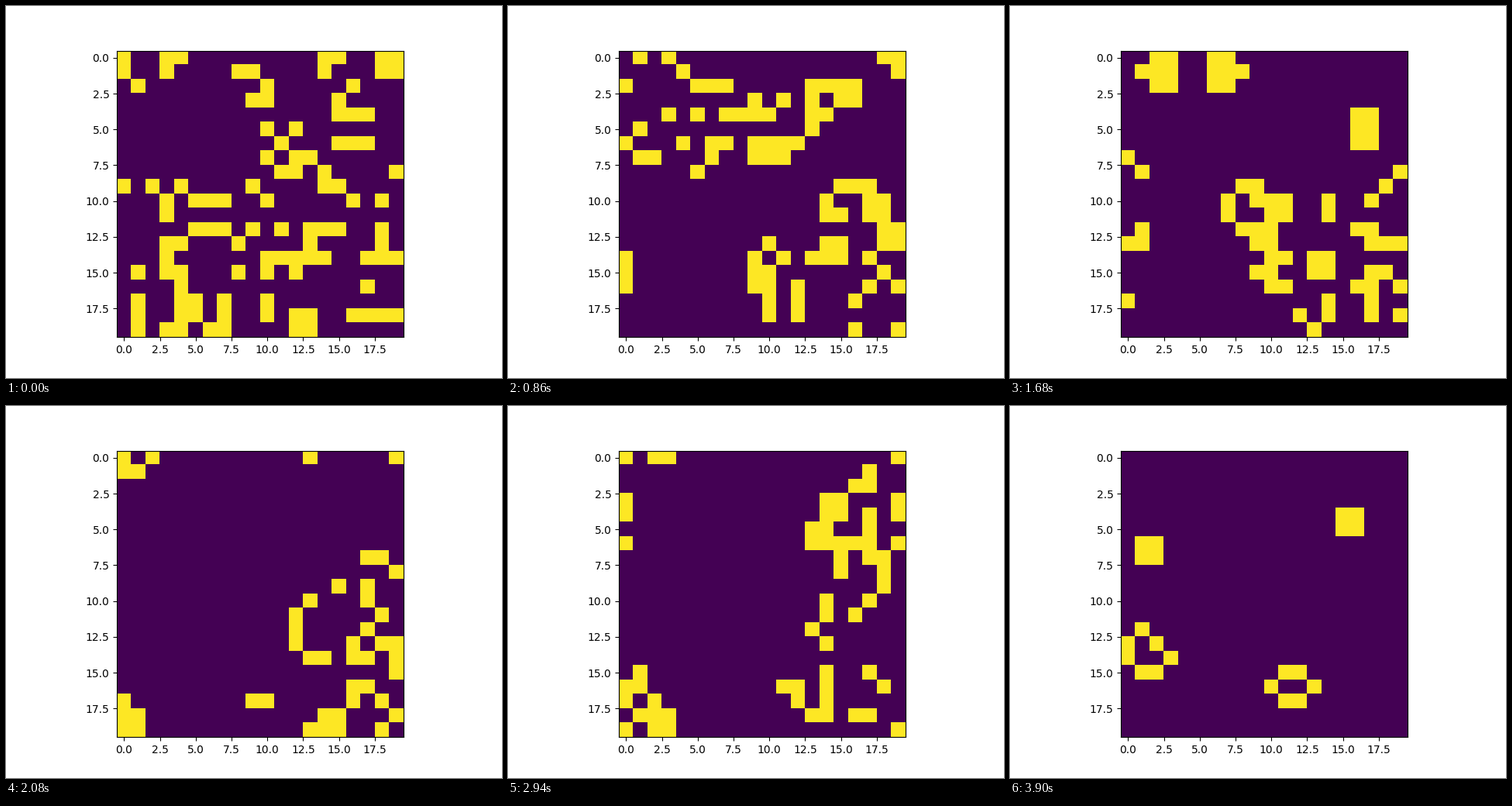
These frames come from a looping animation (640 by 480 pixels, 8 s). A matplotlib script:

```python
import numpy as np
import matplotlib.pyplot as plt
from matplotlib.animation import FuncAnimation

SIZE = 20
LAST = 83           # the board is still from this generation on
TICK = 20           # ms per animation frame
LOOP = 8000         # ms

# Opening position: bars of live cells, from column to column, rows split by "/"
START = """
0 3-4 14-15 18-19 / 0 3 8-9 14 18-19 / 1 10 16 / 9-10 15 / 15-17 /
10 12 / 11 15-17 / 10 12-13 / 11-12 14 19 / 0 2 4 9 14-15 /
3 5-7 10 16 18 / 3 / 5-7 9 11 13-15 18 / 3-4 8 13 18 / 3 10-14 17-19 /
1 3-4 8 10 12 / 4 17 / 1 4-5 7 10 / 1 4-5 7 10 12-13 16-19 / 1 3-4 6-7 12-13
"""


def first_board():
    board = np.zeros((SIZE, SIZE), dtype=int)
    for row, bars in enumerate(START.split("/")):
        for bar in bars.split():
            ends = [int(col) for col in bar.split("-")]
            board[row, ends[0]:ends[-1] + 1] = 1
    return board


def evolve(board):
    """One Game of Life generation on a torus."""
    around = sum(np.roll(board, (dy, dx), axis=(0, 1))
                 for dy in (-1, 0, 1) for dx in (-1, 0, 1) if dy or dx)
    return ((around == 3) | ((board == 1) & (around == 2))).astype(int)


def generation(ms):
    """Three generations per 140 ms, held for 20, 100 and 20 ms."""
    cycle, rest = divmod(ms, 140)
    return min(3 * cycle + (rest >= 20) + (rest >= 120), LAST)


boards = [first_board()]
for _ in range(LAST):
    boards.append(evolve(boards[-1]))

fig, ax = plt.subplots(figsize=(6.4, 4.8), dpi=100)
image = ax.imshow(boards[0], cmap="viridis", vmin=0, vmax=1)


def update(frame):
    image.set_data(boards[generation(frame * TICK)])
    return [image]


anim = FuncAnimation(fig, update, frames=LOOP // TICK, interval=TICK,
                     repeat=True, repeat_delay=0)
plt.show()
```
